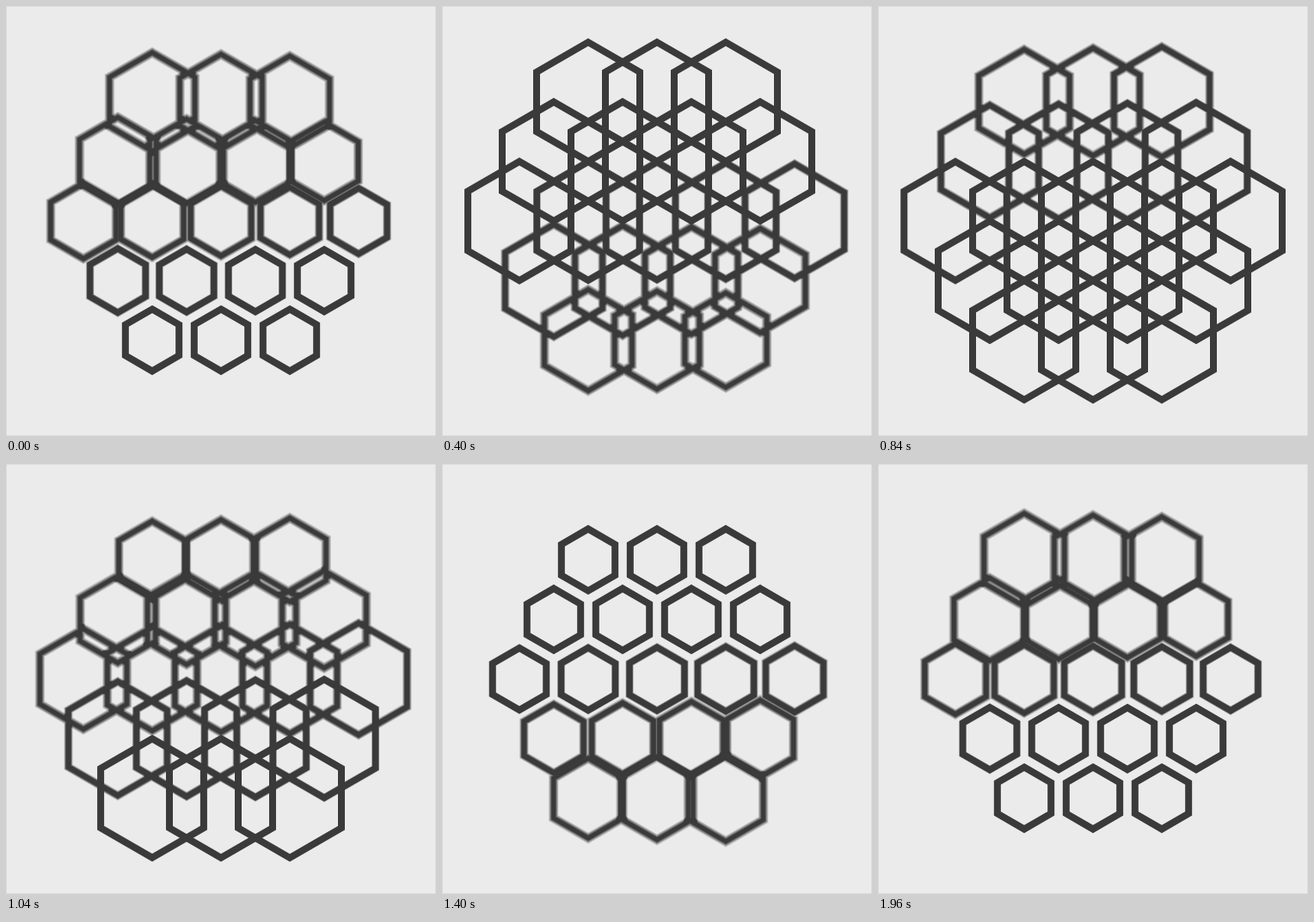
An HTML page with a canvas that plays this animation: 500 by 500 pixels, repeating every 2000 ms.

```html
<!DOCTYPE html>
<html lang="en">
<head>
<meta charset="utf-8">
<title>Hexagon wave</title>
<style>
  html, body { margin: 0; width: 100%; height: 100%; overflow: hidden; background: #ebebeb; }
  canvas { display: block; width: 500px; height: 500px; }
</style>
</head>
<body>
<canvas id="stage" width="500" height="500"></canvas>
<script>
const SIZE = 500, LOOP = 2000, STEP = 40;
const EASE = 596, DELAY = 23.8, START = -328;   // ms
const SHUTTER = 52, SAMPLES = 8;                // motion blur
const SMALL = 36, LARGE = 120 / Math.sqrt(3);   // hexagon radii
const GAP = 80, ROW = GAP * Math.sqrt(3) / 2;

const ctx = document.getElementById("stage").getContext("2d");
const layer = document.createElement("canvas");
layer.width = layer.height = SIZE;
const pen = layer.getContext("2d");

const cells = [];
[3, 4, 5, 4, 3].forEach((count, row) => {
  for (let i = 0; i < count; i++) {
    cells.push({ x: 250 + (i - (count - 1) / 2) * GAP, y: 250 + (row - 2) * ROW });
  }
});

function smooth(p) {
  p = Math.min(1, Math.max(0, p));
  return p * p * (3 - 2 * p);
}

// Grows in the first half of the loop, shrinks in the second.
function radius(time, index) {
  const p = (((time - START - index * DELAY) % LOOP) + LOOP) % LOOP;
  const grown = smooth(p / EASE) - smooth((p - LOOP / 2) / EASE);
  return SMALL + (LARGE - SMALL) * grown;
}

function hexagon(x, y, r) {
  pen.beginPath();
  for (let k = 0; k < 6; k++) {
    const a = k * Math.PI / 3 - Math.PI / 2;
    pen.lineTo(x + r * Math.cos(a), y + r * Math.sin(a));
  }
  pen.closePath();
  pen.stroke();
}

function drawScene(time) {
  pen.fillStyle = "#ebebeb";
  pen.fillRect(0, 0, SIZE, SIZE);
  pen.strokeStyle = "#3a3a3a";
  pen.lineWidth = 8;
  pen.lineJoin = "miter";
  cells.forEach((c, i) => hexagon(c.x, c.y, radius(time, i)));
}

// Running average of several moments within the shutter time.
function render(time) {
  for (let s = 0; s < SAMPLES; s++) {
    drawScene(time + SHUTTER * s / (SAMPLES - 1));
    ctx.globalAlpha = 1 / (s + 1);
    ctx.drawImage(layer, 0, 0);
  }
  ctx.globalAlpha = 1;
  ctx.lineWidth = 1;
  ctx.strokeStyle = "#dcdcdc";
  ctx.strokeRect(0.5, 0.5, SIZE - 1, SIZE - 1);
}

let shown = -1;
function tick() {
  const time = Math.floor((performance.now() % LOOP) / STEP) * STEP;
  if (time !== shown) render(shown = time);
  requestAnimationFrame(tick);
}
tick();
</script>
</body>
</html>
```
